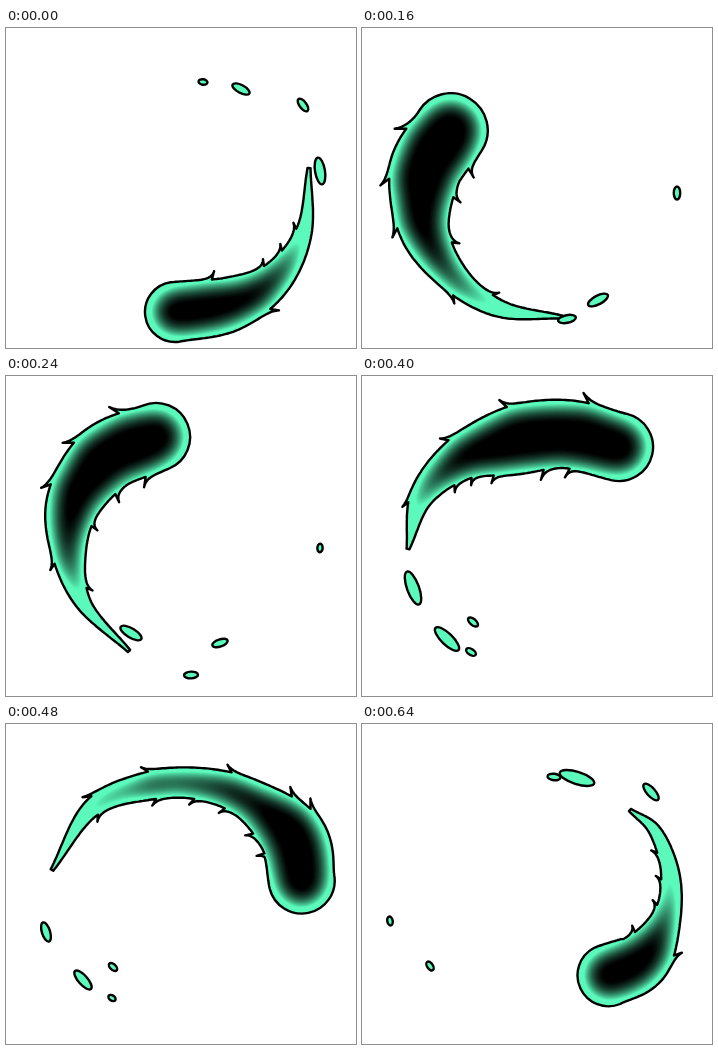
Recreate the animation shown at these times as an HTML page. Size 350x320 px, loop 0.72 s.

```html
<!DOCTYPE html>
<html lang="en">
<head>
<meta charset="utf-8">
<title>Circling wisp</title>
<style>
  html, body { margin: 0; width: 100%; height: 100%; overflow: hidden; background: #fff; }
  svg { display: block; width: 350px; height: 320px; }
  path, ellipse { fill: #5bfabc; stroke: #000; stroke-width: 2.4; stroke-linejoin: round; }
</style>
</head>
<body>
<svg viewBox="0 0 350 320">
  <!-- Dark core: the thicker the body, the blacker its middle -->
  <filter id="core" filterUnits="userSpaceOnUse" x="0" y="0" width="350" height="320" color-interpolation-filters="sRGB">
    <feGaussianBlur in="SourceAlpha" stdDeviation="13"/>
    <feComponentTransfer><feFuncA type="linear" slope="3.1" intercept="-2"/></feComponentTransfer>
    <feComposite in2="SourceAlpha" operator="in" result="dark"/>
    <feMerge><feMergeNode in="SourceGraphic"/><feMergeNode in="dark"/></feMerge>
  </filter>
  <path id="body" filter="url(#core)"/>
  <g id="drops"></g>
</svg>
<script>
const STEP = 80, CX = 180, CY = 165;
const body = document.getElementById('body');
const drops = document.getElementById('drops');

// Catmull-Rom through the spine nodes [x, y, radius]
function spline(nodes, u) {
  const last = nodes.length - 1;
  const i = Math.max(0, Math.min(Math.floor(u), last - 1)), f = u - i;
  const b = nodes[i], c = nodes[i + 1];
  return b.map((p, k) => {
    const a = i > 0 ? nodes[i - 1][k] : 2 * p - c[k];
    const d = i + 2 <= last ? nodes[i + 2][k] : 2 * c[k] - p;
    return p + f / 2 * (c[k] - a + f * (2 * a - 5 * p + 4 * c[k] - d + f * (3 * (p - c[k]) + d - a)));
  });
}

// One edge of the body; flare is 0 to 1, full at the tip of a spike
function edge(nodes, tips, side) {
  const end = nodes.length - 1, points = [];
  const add = (u, flare) => {
    const [x, y, r] = spline(nodes, u);
    const [x0, y0] = spline(nodes, u - .01), [x1, y1] = spline(nodes, u + .01);
    const off = side * (r + flare * (4 + .15 * r)) / Math.hypot(x1 - x0, y1 - y0);
    points.push([x - (y1 - y0) * off, y + (x1 - x0) * off].map(v => v.toFixed(1)).join(' '));
  };
  let u = 0;
  for (const tip of [...tips, end]) {
    const spike = tip < end ? 1 : 0;
    for (; u < tip; u += .04) add(u, spike * Math.exp((u - tip) * 8));
    add(tip, spike);
    u = tip - .1;
  }
  return points;
}

function outline({ nodes, outer, inner }) {
  const a = edge(nodes, outer, 1), b = edge(nodes, inner, -1).reverse(), r = nodes[0][2];
  return `M${a.join('L')}L${b.join('L')}A${r} ${r} 0 0 0 ${a[0]}Z`;
}

// Drops [x, y, half length] lie along the ring
function marks(list) {
  return list.map(([x, y, r]) => {
    const turn = Math.atan2(y - CY, x - CX) * 180 / Math.PI + 90;
    return `<ellipse rx="${r}" ry="${1.6 + .25 * r}" transform="translate(${x} ${y}) rotate(${turn})"/>`;
  }).join('');
}

const pose = (nodes, outer, inner, bits) => ({ nodes, outer, inner, bits });

// Halfway pose, turned around the ring centre
function between(p, q, bits) {
  const ratio = (p.nodes.length - 1) / (q.nodes.length - 1);
  const nodes = q.nodes.map(([x, y, r], i) => {
    const [px, py, pr] = spline(p.nodes, i * ratio);
    const from = Math.atan2(py - CY, px - CX), turn = Math.atan2(y - CY, x - CX) - from;
    const angle = from + Math.atan2(Math.sin(turn), Math.cos(turn)) / 2;
    const dist = (Math.hypot(px - CX, py - CY) + Math.hypot(x - CX, y - CY)) / 2;
    return [CX + dist * Math.cos(angle), CY + dist * Math.sin(angle), (pr + r) / 2];
  });
  return pose(nodes, q.outer, q.inner, bits);
}

const bottom = pose(
  [[169, 284, 30], [224, 276, 27], [270, 250, 17], [298, 203, 8], [303, 140, 1.5]],
  [1.7], [.85, 2.1, 2.6, 3.1],
  [[197, 54, 4.5], [235, 61, 9.5], [297, 77, 7.5], [314, 143, 13.5]]);

const left = pose(
  [[67, 175, 40], [70, 219, 37], [107, 270, 22], [168, 291, 12], [222, 284, 9], [271, 254, 1.5]],
  [1.55, 3, 4.7], [.95, 1.25, 1.7, 3.2, 3.9],
  [[244, 66, 6.5], [300, 84, 5], [315, 156, 9.5], [304, 184, 6], [283, 226, 9.5]]);

const upperLeft = pose(
  [[150, 61, 34], [100, 82, 34], [67, 128, 27], [63, 178, 17], [78, 228, 7.5], [123, 275, 1.5]],
  [.6, 1.3, 1.95, 3.25], [.5, 1.5, 2.5, 3.85],
  [[125, 257, 12], [214, 267, 8], [185, 299, 7], [314, 172, 4.2]]);

const topMost = pose(
  [[257, 71, 34], [203, 58, 34], [150, 65, 34], [98, 83, 22], [60, 120, 12], [46, 173, 1.5]],
  [.8, 2.05, 3.1, 4.3], [.9, 1.6, 2.6, 3.1, 3.5],
  [[51, 212, 17.5], [85, 263, 16], [111, 246, 6], [109, 276, 5.5]]);

const right = pose(
  [[296, 158, 33], [287, 114, 33], [244, 76, 21], [195, 60, 16], [142, 62, 14], [86, 84, 9], [46, 146, 1.5]],
  [1.3, 1.6, 2.6, 4.05, 5], [1.2, 1.7, 2.5, 3.2, 4, 5.1],
  [[40, 208, 10], [77, 256, 12], [107, 243, 5], [106, 274, 4]]);

const lowerRight = pose(
  [[245, 252, 31], [281, 235, 28], [305, 192, 14], [308, 148, 9], [293, 107, 6], [268, 86, 1.5]],
  [1.5], [1.5, 2.3, 2.95, 3.6],
  [[192, 53, 6.5], [215, 54, 18], [289, 68, 10.5], [28, 197, 4.5], [68, 242, 5]]);

const poses = [
  bottom,
  left,
  between(left, upperLeft, [[236, 272, 11], [205, 291, 9], [315, 165, 6.5]]),
  upperLeft,
  between(upperLeft, topMost, [[96, 262, 13], [118, 250, 7], [150, 288, 8]]),
  topMost,
  right,
  between(right, lowerRight, [[118, 68, 9], [33, 203, 7], [72, 249, 8]]),
  lowerRight
].map(p => ({ path: outline(p), drops: marks(p.bits) }));

let shown = -1;
const start = performance.now();
function tick() {
  const i = Math.floor((performance.now() - start) / STEP) % poses.length;
  if (i !== shown) {
    shown = i;
    body.setAttribute('d', poses[i].path);
    drops.innerHTML = poses[i].drops;
  }
  requestAnimationFrame(tick);
}
tick();
</script>
</body>
</html>
```
